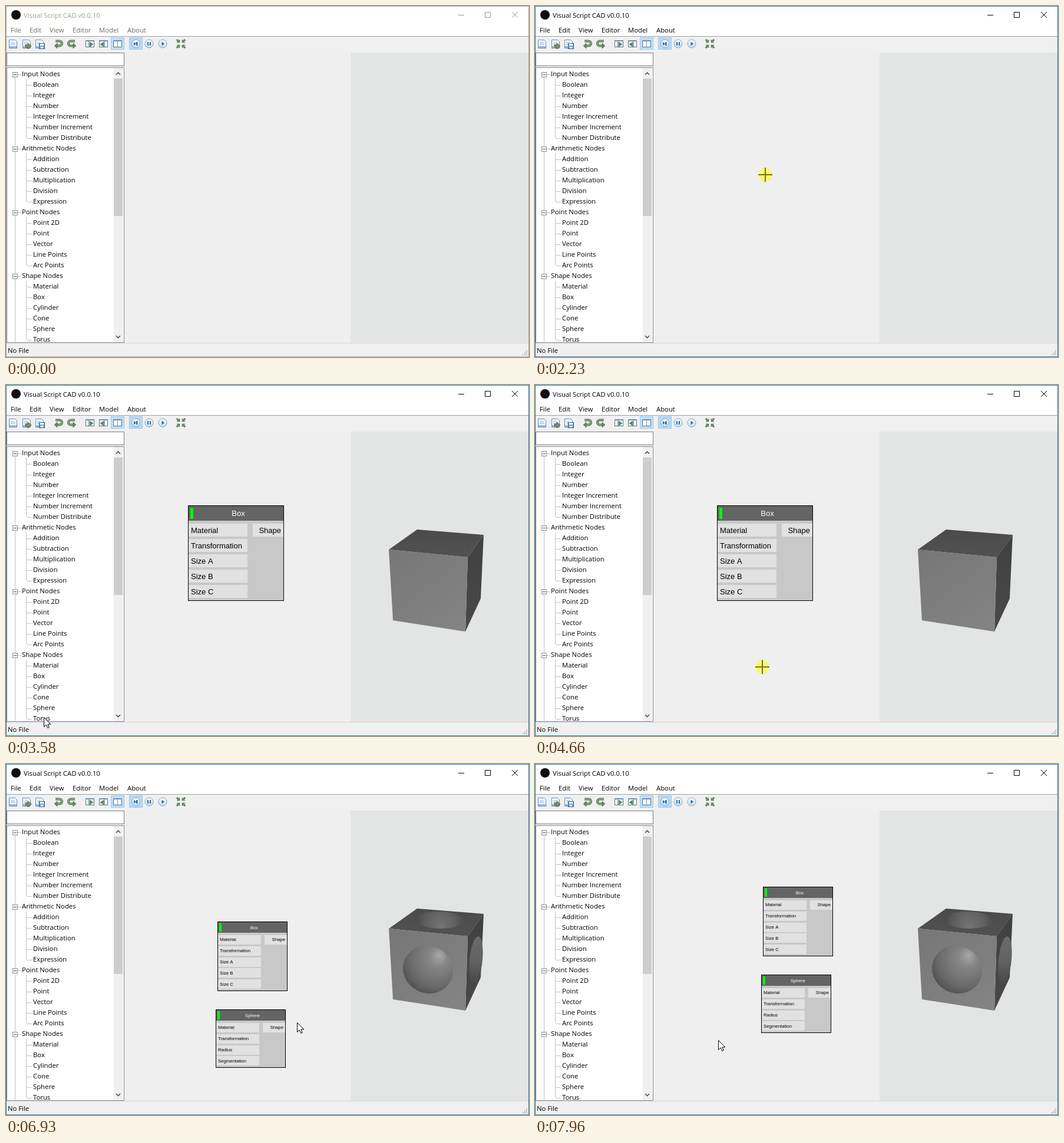
An HTML page with a canvas for the animation above (8000 ms loop, 888 by 595 pixels).

```html
<!DOCTYPE html>
<html>
<head>
<meta charset="utf-8">
<style>
html, body { margin: 0; width: 100%; height: 100%; overflow: hidden; background: #f0f0f0; }
canvas { display: block; }
</style>
</head>
<body>
<canvas id="stage" width="888" height="595"></canvas>
<script>
const ctx = document.getElementById('stage').getContext('2d');
const UI = '11.3px "Open Sans", "Noto Sans", sans-serif';
const LOOP = 8000;

const groups = [
  ['Input Nodes', 'Boolean', 'Integer', 'Number', 'Integer Increment', 'Number Increment', 'Number Distribute'],
  ['Arithmetic Nodes', 'Addition', 'Subtraction', 'Multiplication', 'Division', 'Expression'],
  ['Point Nodes', 'Point 2D', 'Point', 'Vector', 'Line Points', 'Arc Points'],
  ['Shape Nodes', 'Material', 'Box', 'Cylinder', 'Cone', 'Sphere', 'Torus']
];
const menus = [['File', 8], ['Edit', 40], ['View', 74], ['Editor', 113], ['Model', 158], ['About', 206]];

// Pointer path: time, x, y
const path = [
  [120, 876, 580], [630, 396, 336], [730, 396, 336], [1470, 56, 497], [1560, 56, 497],
  [2230, 391, 286], [2410, 391, 286], [3220, 63, 522], [3255, 63, 522], [3300, 59, 535],
  [3400, 59, 535], [3580, 64, 563], [3800, 56, 547], [3850, 56, 547], [4280, 300, 505],
  [4660, 386, 478], [5300, 386, 478], [5950, 495, 448], [6220, 495, 448], [6370, 502, 438],
  [6500, 502, 438], [6520, 502, 437], [6749, 502, 437], [6750, 494, 438], [7060, 494, 438],
  [7110, 489, 445], [7560, 517, 386], [7620, 517, 386], [7910, 361, 433], [7960, 311, 468]
];

const ease = k => k * k * (3 - 2 * k);
const clamp = k => Math.max(0, Math.min(1, k));

function rect(x, y, w, h, fill) {
  ctx.fillStyle = fill;
  ctx.fillRect(x, y, w, h);
}

function frame(x, y, w, h, line, fill) {
  if (fill) rect(x, y, w, h, fill);
  ctx.strokeStyle = line;
  ctx.lineWidth = 1;
  ctx.strokeRect(x + .5, y + .5, w - 1, h - 1);
}

function text(str, x, y, color = '#000', font = UI, align = 'left') {
  ctx.font = font;
  ctx.fillStyle = color;
  ctx.textAlign = align;
  ctx.fillText(str, x, y);
}

function shape(d, fill, line, width = 1, x = 0, y = 0) {
  const p = new Path2D(d);
  ctx.save();
  ctx.translate(x, y);
  if (fill) { ctx.fillStyle = fill; ctx.fill(p); }
  if (line) { ctx.strokeStyle = line; ctx.lineWidth = width; ctx.stroke(p); }
  ctx.restore();
}

function disc(x, y, r, fill, line) {
  ctx.beginPath();
  ctx.arc(x, y, r, 0, 7);
  ctx.fillStyle = fill;
  ctx.fill();
  if (line) { ctx.strokeStyle = line; ctx.lineWidth = 1; ctx.stroke(); }
}

function fade(g, ...colors) {
  colors.forEach((c, i) => g.addColorStop(i / (colors.length - 1), c));
  return g;
}

function dots(x1, y1, x2, y2) {
  ctx.setLineDash([1, 1]);
  shape(`M${x1} ${y1}L${x2} ${y2}`, null, '#808080');
  ctx.setLineDash([]);
}

function titleBar(active) {
  const ink = active ? '#000' : '#9a9f92';
  rect(0, 0, 888, 51, '#fff');
  disc(17, 15, 8, '#130c0e');
  text('Visual Script CAD v0.0.10', 30, 20, ink);
  for (const [name, x] of menus) text(name, x, 45, active ? '#000' : '#66705f');
  shape('M768 15.5H778M813.5 10.5H822.5V19.5H813.5ZM859 10L869 20M869 10L859 20', null, active ? '#000' : '#999');
}

function sheet(x) {
  const fill = fade(ctx.createLinearGradient(0, 57, 0, 72), '#f7fbff', '#b9d5ef');
  shape('M.5 .5H10.5L13.5 3.5V14.5H.5Z', fill, '#5b8cbd', 1, x, 57);
  shape('M3 4.5H9M3 6.5H11M3 8.5H11', null, '#9cc0e2', 1, x, 57);
  shape('M1 12.5H13', null, '#6c9fd0', 2, x, 57);
}

function panel(x, split) {
  frame(x, 58, 15, 12, '#4d7196', '#fff');
  rect(x, 58, 15, 2, '#6b91b8');
  rect(x + split, 60, 1, 10, '#6b8fac');
}

function toolbar() {
  const green = '#6b8a67', dark = '#48664b';
  rect(0, 51, 888, 1, '#a0a0a0');
  rect(0, 52, 888, 27, '#f0f0f0');
  frame(178, 53, 23, 21, '#9dc8ee', '#c2dff6');
  frame(209, 53, 23, 21, '#9dc8ee', '#b9d9f4');
  sheet(5);
  sheet(28);
  shape('M33 66H37V63L43 68L37 73V70H33Z', '#8a8f62', '#4f5b40');
  sheet(50);
  frame(56, 63, 10, 10, '#35608f', '#7ca9d8');
  rect(58, 64, 6, 3, '#fff');
  rect(59, 69, 4, 3, '#e8f1fa');
  const bend = 'M84 59.5H91A3.5 3.5 0 0 1 91 67.5H86';
  const head = 'M87 63V72L82 67.5Z';
  shape(bend, null, dark, 4);
  shape(bend, null, '#93ac86', 2);
  shape(head, green, dark, .7);
  ctx.save();
  ctx.translate(201, 0);
  ctx.scale(-1, 1);
  shape(bend, null, dark, 4);
  shape(bend, null, '#93ac86', 2);
  shape(head, green, dark, .7);
  ctx.restore();
  panel(135, 5);
  shape('M142 61L148 65L142 69Z', '#5d8f50', dark, .7);
  panel(158, 9);
  shape('M166 61L160 65L166 69Z', '#5d8f50', dark, .7);
  panel(182, 7);
  for (const x of [220.5, 243, 266]) {
    disc(x, 64, 7, fade(ctx.createLinearGradient(0, 57, 0, 71), '#fff', '#c3dcf3'), '#7aa2c8');
  }
  const blue = '#2f6ba6';
  shape('M217 61L221 64L217 67ZM221 61H223.5V67H221Z', blue);
  shape('M240 61H242V67H240ZM244 61H246V67H244Z', blue);
  shape('M264.5 60.5L269 64L264.5 67.5Z', blue);
  for (const a of [0, 1, 2, 3]) {
    ctx.save();
    ctx.translate(297, 64);
    ctx.rotate(a * Math.PI / 2);
    shape('M2 2H7L5.5 3.5L8 6L6 8L3.5 5.5L2 7Z', green, dark, .5);
    ctx.restore();
  }
}

function tree() {
  frame(1, 79, 200, 23, '#7a7a7a', '#fff');
  frame(1, 104, 200, 467, '#828790', '#fff');
  ctx.save();
  ctx.beginPath();
  ctx.rect(2, 105, 198, 465);
  ctx.clip();
  dots(15.5, 116, 15.5, 570);
  let y = 115;
  for (const [name, ...items] of groups) {
    dots(34.5, y + 9, 34.5, y + 18 * items.length + 1);
    dots(20, y + 1.5, 25, y + 1.5);
    frame(11, y - 3, 9, 9, '#919191', '#f2f4f6');
    rect(13, y + 1, 5, 1, '#4b63a7');
    text(name, 27, y + 4);
    y += 18;
    for (const item of items) {
      dots(36, y + 1.5, 44, y + 1.5);
      text(item, 46, y + 4);
      y += 18;
    }
  }
  rect(183, 105, 16, 465, '#f0f0f0');
  rect(183, 123, 15, 233, '#cdcdcd');
  shape('M187 116.5L190.5 113L194 116.5M187 559L190.5 562.5L194 559', null, '#505050', 1.6);
  ctx.restore();
}

function background(active) {
  rect(0, 0, 888, 595, '#f0f0f0');
  titleBar(active);
  toolbar();
  tree();
  rect(201, 79, 384, 492, '#efefef');
  rect(585, 79, 302, 492, '#e3e5e4');
  rect(1, 571, 886, 1, '#d7d7d7');
  text('No File', 3, 588);
  for (let r = 0; r < 3; r++)
    for (let c = 0; c <= r; c++) rect(883 - 3 * c, 584 + 3 * r, 2, 2, '#bfb8b8');
}

function node(name, x, y, inputs, view) {
  const s = view.s;
  const X = Math.round(494.5 + (x - 494.5) * s + view.x);
  const Y = Math.floor(437 + (y - 437) * s + view.y);
  const z = v => Math.round(v * s);
  const size = 13 - (1 - s) * 19.2;
  const font = size + 'px "Liberation Sans", Arial, sans-serif';
  const drop = size * .36;
  const w = z(163), h = z(32 + 26 * inputs.length);
  rect(X, Y, w, h, '#c8c8c8');
  rect(X, Y, w, z(26), '#646464');
  rect(X + z(4), Y + z(4), z(5), z(19), '#00ff00');
  text(name, X + 85.5 * s, Math.round(Y + 13.3 * s + drop), '#fff', font, 'center');
  inputs.forEach((label, i) => {
    const top = 31 + 26 * i;
    rect(X + 1, Y + z(top), z(101) - 1, z(22), '#e1e1e1');
    text(label, X + z(5), Math.round(Y + (top + 11) * s + drop), '#000', font);
  });
  rect(X + z(110), Y + z(31), w - 1 - z(110), z(22), '#e1e1e1');
  text('Shape', X + z(158), Math.round(Y + 42 * s + drop), '#000', font, 'right');
  frame(X, Y, w, h, '#000');
}

function cap(x, y, rx, ry, turn, fill) {
  ctx.beginPath();
  ctx.ellipse(x, y, rx, ry, turn, 0, 7);
  ctx.fillStyle = fill;
  ctx.fill();
}

function cube(bumps) {
  shape('M650 279L698 245L811 254L784 292Z', fade(ctx.createLinearGradient(0, 245, 0, 292), '#4b4b4b', '#515151'));
  shape('M784 292L811 254L806 362L780 418Z', fade(ctx.createLinearGradient(790, 255, 790, 418), '#404040', '#494949'));
  shape('M650 279L784 292L780 418L657 399Z', fade(ctx.createLinearGradient(660, 280, 760, 415), '#777', '#838383'));
  if (!bumps) return;
  cap(735.5, 264.5, 41.5, 14.5, .03, fade(ctx.createRadialGradient(738, 276, 2, 738, 268, 43), '#737373', '#626262', '#494949'));
  cap(798, 332, 11, 40, .1, fade(ctx.createLinearGradient(794, 293, 802, 372), '#6b6b6b', '#626262', '#474747'));
  cap(716.5, 348.5, 43, 40, .45, fade(ctx.createRadialGradient(737, 324, 1, 728, 334, 62), '#a6a6a6', '#868686', '#787878', '#686868', '#4c4c4c'));
}

function pointer(t) {
  if (t < path[0][0]) return;
  let i = path.findIndex(p => p[0] > t);
  if (i < 0) i = path.length;
  const a = path[i - 1], b = path[i] || a;
  const k = b === a ? 0 : ease((t - a[0]) / (b[0] - a[0]));
  const x = Math.round(a[1] + (b[1] - a[1]) * k);
  const y = Math.round(a[2] + (b[2] - a[2]) * k);
  const dragging = t >= 1600 && t < 2460 || t >= 3840 && t < 4990;
  if (dragging) {
    disc(x, y, 12, '#f8f67c');
    rect(x - 12, y - 1, 24, 2, '#77750e');
    rect(x - 1, y - 12, 2, 24, '#77750e');
  } else {
    shape('M.5 .5V16.5L4.2 13L6.8 18.5L9.2 17.5L6.8 12H11.7Z', '#fff', '#000', 1, x, y);
  }
}

function draw(t) {
  const active = t >= 120;
  const zoom = t < 6795 ? 0 : t < 6840 ? 1 : t < 6930 ? 2 : 3;
  const pan = ease(clamp((t - 7110) / 450));
  const view = { s: .9 ** zoom, x: Math.round(28 * pan), y: Math.round(-59 * pan) };
  background(active);
  if (t >= 2460) {
    cube(t >= 4990);
    node('Box', 309, 204, ['Material', 'Transformation', 'Size A', 'Size B', 'Size C'], view);
  }
  if (t >= 4990) node('Sphere', 304, 409, ['Material', 'Transformation', 'Radius', 'Segmentation'], view);
  pointer(t);
  frame(0, 0, 888, 595, active ? '#1883d7' : '#aaa');
}

const start = performance.now();
function tick() {
  draw((performance.now() - start) % LOOP);
  requestAnimationFrame(tick);
}
tick();
</script>
</body>
</html>
```
